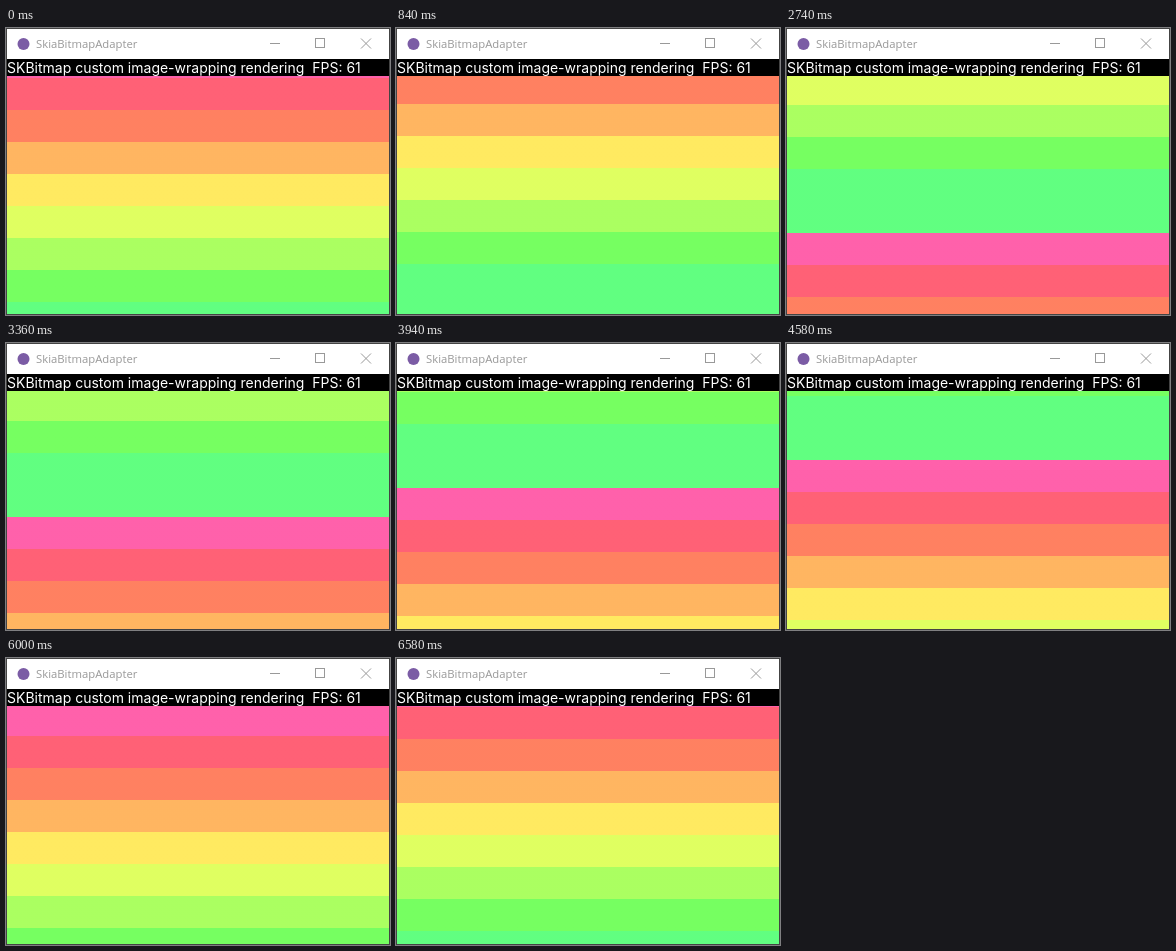
An HTML page for the animation above (6600 ms loop, 384 px wide and 287 px high).

```html
<!DOCTYPE html>
<html lang="en">
<head>
<meta charset="utf-8">
<title>SkiaBitmapAdapter</title>
<style>
  html, body { margin: 0; width: 100%; height: 100%; overflow: hidden; background: #fff; }
  .window {
    position: relative; box-sizing: border-box;
    width: 384px; height: 287px;
    border: 1px solid #444; background: #fff; overflow: hidden;
  }
  .title {
    position: absolute; left: 29px; top: 5px;
    font: 11.3px/20px "Open Sans", "Noto Sans", sans-serif;
    color: #999; white-space: pre;
  }
  .chrome { position: absolute; left: -1px; top: -1px; }
  .status {
    position: absolute; left: 0; top: 30px; width: 382px; height: 17px;
    background: #000; color: #fff; white-space: pre;
    font: 14px/17px Inter, sans-serif;
  }
  .view { position: absolute; left: 0; top: 47px; width: 382px; height: 238px; overflow: hidden; }

  /* Nine hues in 32px bands; the last band is twice as tall. */
  .bands {
    position: absolute; left: 0; top: -30px; width: 100%; height: 640px;
    background: repeating-linear-gradient(
      hsl(332 100% 69%) 0 32px,
      hsl(352 100% 69%) 32px 64px,
      hsl(12 100% 69%) 64px 96px,
      hsl(32 100% 69%) 96px 128px,
      hsl(52 100% 69%) 128px 160px,
      hsl(72 100% 69%) 160px 192px,
      hsl(92 100% 69%) 192px 224px,
      hsl(112 100% 69%) 224px 256px,
      hsl(132 100% 69%) 256px 320px);
    animation: scroll 6600ms -1ms infinite;
  }

  /* One pixel per tick, with two slightly slower stretches. */
  @keyframes scroll {
    0%         { transform: translateY(0);      animation-timing-function: step-end; }
    0.454545%  { transform: translateY(-1px);   animation-timing-function: steps(29); }
    10.303030% { transform: translateY(-30px);  animation-timing-function: steps(170); }
    61.818182% { transform: translateY(-200px); animation-timing-function: step-end; }
    62.121212% { transform: translateY(-201px); animation-timing-function: steps(20); }
    69.393939% { transform: translateY(-221px); animation-timing-function: steps(100); }
    99.696970%, 100% { transform: translateY(-321px); animation-timing-function: step-end; }
  }
</style>
</head>
<body>
<div class="window">
  <svg class="chrome" width="384" height="31" fill="none" stroke="#999">
    <circle cx="17.5" cy="16" r="6" fill="#7b5ca5" stroke="none"/>
    <path d="M264 15.5h10M309.5 10.5h9v9h-9z" shape-rendering="crispEdges"/>
    <path d="M355 10.5l10 10M365 10.5l-10 10"/>
  </svg>
  <div class="title">SkiaBitmapAdapter</div>
  <div class="status">SKBitmap custom image-wrapping rendering  FPS: 61</div>
  <div class="view"><div class="bands"></div></div>
</div>
</body>
</html>
```
